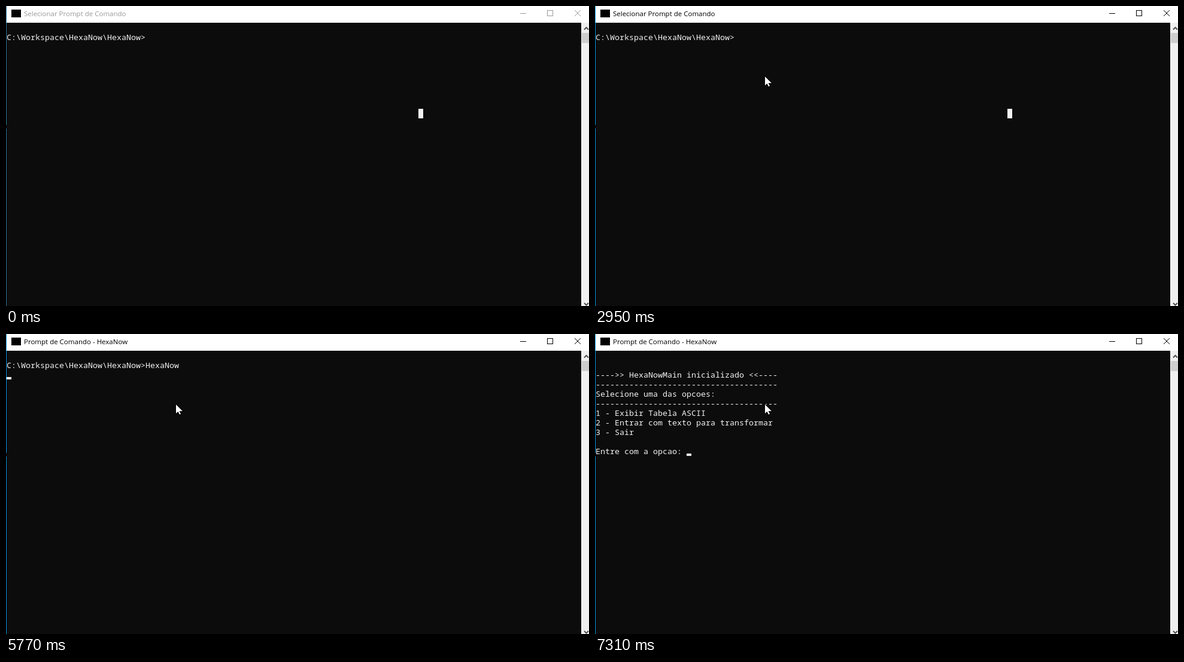
Write an HTML page that moves like this. It is 974x502 px and loops after 8000 ms.

```html
<!DOCTYPE html>
<html lang="pt">
<head>
<meta charset="utf-8">
<style>
html, body { margin: 0; width: 100%; height: 100%; overflow: hidden; background: #0c0c0c; }
svg, pre { position: absolute; left: 0; top: 0; }
pre {
  left: 1px; top: 28px; margin: 0;
  font: 500 13.333px/16px "Noto Sans Mono", monospace; font-variant-ligatures: none;
}
#title { font: 11.5px "Open Sans", sans-serif; }
</style>
</head>
<body>
<svg width="974" height="502">
  <rect width="974" height="28" fill="#fff"/>
  <rect id="edge" width="1" height="502"/>
  <rect y="199" width="1" height="6" fill="#0c0c0c"/>
  <rect x="9" y="6" width="16" height="13"/>
  <text id="title" x="30" y="17"/>
  <g id="buttons" fill="none">
    <path d="M859 12.5h10M904.5 7.5h9v9h-9z" shape-rendering="crispEdges"/>
    <path d="M950 7l10 10m0-10l-10 10"/>
  </g>
  <rect x="961" y="28" width="13" height="474" fill="#f0f0f0"/>
  <rect x="962" y="45" width="12" height="17" fill="#cdcdcd"/>
  <path d="M966 39.5l3.5-3.5 3.5 3.5M966 497l3.5 3.5 3.5-3.5" fill="none" stroke="#505050" stroke-width="2"/>
</svg>
<pre id="screen"></pre>
<svg width="974" height="502">
  <rect id="block" x="689" y="172" width="8" height="16" fill="#f2f2f2"/>
  <rect id="caret" width="8" height="4" fill="#f2f2f2"/>
  <circle id="click" cx="277" cy="57" r="12" fill="#808000"/>
  <path id="mouse" d="M0 0v15l3.4-3.2 2.6 5 2-1-2.4-4.8h5.4z" fill="#fff" stroke="#000" paint-order="stroke" stroke-width="2"/>
</svg>
<script>
const $ = id => document.getElementById(id);
const prompt = '\nC:\\Workspace\\HexaNow\\HexaNow>';
const rule = '-'.repeat(38);
const loading = `Alocando memoria para dados da tabela ASC...
Memoria alocada com sucesso...
Inicializar carga de valores
Pressione qualquer tecla para continuar. . . `.split('\n');
const menu = `

---->> HexaNowMain inicializado <<----
${rule}
Selecione uma das opcoes:
${rule}
1 - Exibir Tabela ASCII
2 - Entrar com texto para transformar
3 - Sair

Entre com a opcao: `;

const FOCUS = 1890, TYPE = 3260, ENTER = 5770, CLEAR = 7240, STEP = 70;

const typed = (word, start, pace, t) =>
  word.slice(0, Math.max(0, Math.floor((t - start) / pace) + 1));

function screenText(t) {
  if (t < ENTER + STEP) {
    return prompt + typed('Hexa', TYPE, 240, t) + typed('Now', 4670, 275, t) + (t < ENTER ? '' : '\n');
  }
  if (t < CLEAR) return loading.slice(0, 2 * Math.floor((t - ENTER) / STEP)).join('\n');
  return t < CLEAR + STEP ? '' : menu;
}

function caretOn(t) {
  if (t < 2420) return false;
  if (t < ENTER) return (t - 2420) % 1080 < 530;
  return t < CLEAR ? t < 6700 : t >= CLEAR + STEP;
}

function glide(t, start, end, a, b) {
  const u = Math.min(1, Math.max(0, Math.floor((t - start) / STEP) * STEP / (end - start)));
  const k = u * u * (3 - 2 * u);
  return a.map((v, i) => Math.round(v + (b[i] - v) * k));
}

function mouseAt(t) {
  if (t < 1480) return glide(t, 70, 280, [585, 364], [445, 257]);
  if (t < 1950) return glide(t, 1480, 1900, [452, 250], [278, 59]);
  return glide(t, 1950, 2230, [278, 59], [284, 118]);
}

const set = (id, attrs) => {
  for (const name in attrs) $(id).setAttribute(name, attrs[name]);
};
const show = (id, on) => set(id, { visibility: on ? 'visible' : 'hidden' });
const put = (id, text) => { if ($(id).textContent !== text) $(id).textContent = text; };

function draw(t) {
  const active = t >= FOCUS;
  const text = screenText(t);
  const lines = text.split('\n');

  put('screen', text);
  $('screen').style.color = t >= ENTER + STEP && t < CLEAR ? '#fdf9a5' : '#f2f2f2';
  put('title', (t < TYPE ? 'Selecionar ' : '') + 'Prompt de Comando' + (t < ENTER ? '' : ' - HexaNow'));
  set('title', { fill: active ? '#000' : '#999' });
  set('buttons', { stroke: active ? '#000' : '#999' });
  set('edge', { fill: active ? '#0097e0' : '#2b7a9e' });

  set('caret', { x: 1 + 8 * lines.at(-1).length, y: 24 + 16 * lines.length });
  show('caret', caretOn(t));
  show('block', t < TYPE);
  show('click', active && t < 2020);
  show('mouse', t >= 70);
  set('mouse', { transform: `translate(${mouseAt(t)})` });
}

const start = performance.now();
function tick() {
  draw((performance.now() - start) % 8000);
  requestAnimationFrame(tick);
}
tick();
</script>
</body>
</html>
```
